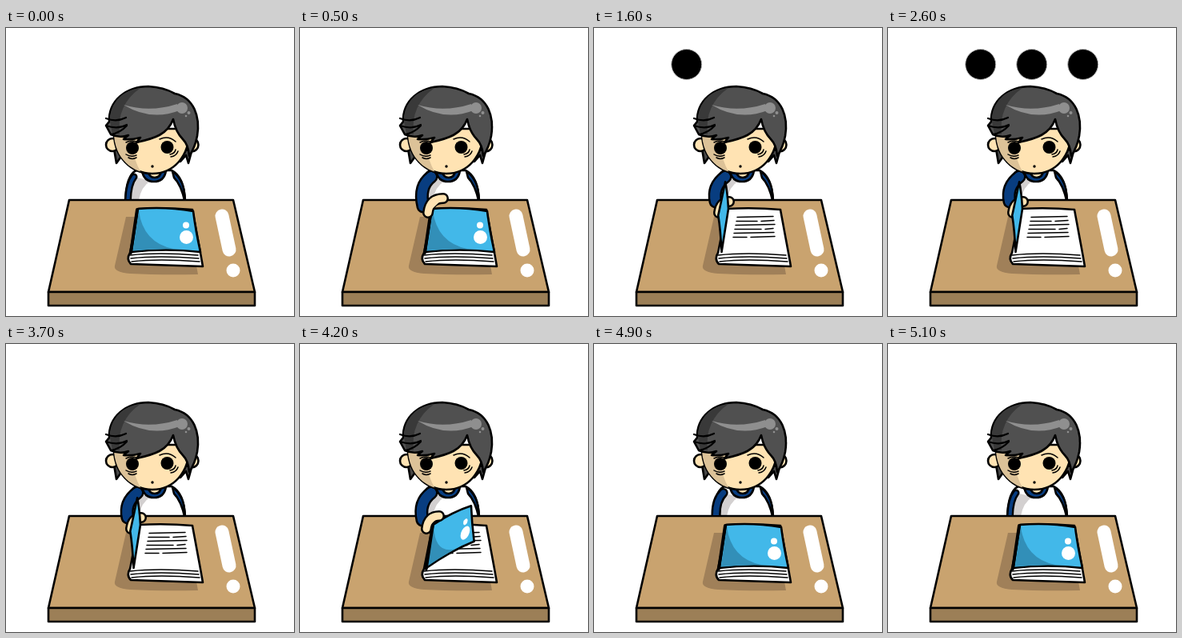
These frames come from a looping animation (360 px wide and 360 px high, 5200 ms). An HTML page:

```html
<!DOCTYPE html>
<html lang="en">
<head>
<meta charset="utf-8">
<title>Opening a book</title>
<style>
html, body { margin: 0; width: 100%; height: 100%; overflow: hidden; background: #fff; }
svg { display: block; width: 100vw; height: 100vh; }
path, circle { vector-effect: non-scaling-stroke; }
.ink { stroke: #000; stroke-width: 2.6; stroke-linejoin: round; stroke-linecap: round; }
.line { fill: none; stroke: #000; stroke-width: 1.5; stroke-linecap: round; }
.limb path { stroke-linecap: round; stroke-linejoin: round; }
.skin { fill: #ffe3b3; }
.navy { fill: #083d80; }
.gray { fill: #8f8f8f; }
</style>
</head>
<body>
<svg viewBox="0 0 360 360">
  <defs>
    <clipPath id="behind"><path d="M0 0H360V214H0Z"/></clipPath>
    <clipPath id="faceClip"><path id="face" d="M135 126C133 162 158 182 183 182S230 162 229 126Z"/></clipPath>
  </defs>
  <g id="dots" stroke="#bbb"></g>

  <!-- body -->
  <path class="ink" fill="#fff" d="M149 217Q150 184 163 178H207Q223 186 224 217Z"/>
  <path fill="#d3d0d0" d="M160 186L181 191Q169 198 166 215H157Z"/>
  <path class="ink navy" d="M208 179Q224 190 223.500 217Q219 196 210 187Z"/>
  <path class="ink navy" d="M170 178Q172 192 185 192T200 178Z"/>
  <path class="ink skin" d="M177 178Q179 187 186 187T194 178Z"/>

  <!-- table -->
  <path class="ink" fill="#c9a36f" d="M79 215H284L311 330H53Z"/>
  <path class="ink" fill="#9c7f57" d="M53 330H311V347H53Z"/>
  <path fill="#a08059" d="M150 236H163L156 292L238 297L240 308Q193 309 155 307Q134 305 136 297Z"/>
  <path stroke="#fff" stroke-width="17" stroke-linecap="round" d="M270 235L279 277"/>
  <circle cx="284" cy="303" r="8.500" fill="#fff"/>

  <!-- pages -->
  <path class="ink" fill="#fff" d="M166 226Q200 224 233 227L243 281L246 298L156 295Q150 289 155 281Z"/>
  <path id="edges" class="line"/>
  <path id="text" class="line"/>

  <g id="stack">
    <g id="cover">
      <path class="ink" fill="#42b8e9" d="M0 0Q35 -3 69 3Q72 27 78 54Q35 49 -8.500 54Z"/>
      <g id="shine">
        <path fill="#328fb8" d="M1 2Q6 42 44 50Q18 50 -6 52Z"/>
        <path class="ink" style="stroke-width:4" d="M-1 1L-9 55"/>
        <circle cx="60" cy="20.500" r="4" fill="#fff"/>
        <circle cx="60.500" cy="35.500" r="8.500" fill="#fff"/>
      </g>
    </g>
    <g id="arm" class="limb">
      <g id="sleeve" fill="none"><path stroke="#000"/><path stroke="#083d80"/></g>
      <g id="hand" class="skin"><path stroke="#000"/><path stroke="#ffe3b3"/></g>
    </g>
  </g>

  <!-- head -->
  <path class="ink" fill="#484848" d="M134 145L138 169L148 155ZM217 145L218 167L225 159L228 169L236 140Z"/>
  <circle class="ink skin" cx="133" cy="146" r="8"/>
  <circle class="ink skin" cx="232" cy="146" r="8.500"/>
  <use href="#face" class="ink skin"/>
  <path fill="#dcc298" clip-path="url(#faceClip)" d="M130 120H168Q148 145 170 183H130Z"/>
  <circle cx="158" cy="150" r="8"/>
  <circle cx="201.500" cy="149" r="8"/>
  <circle cx="183" cy="173" r="1.700"/>
  <path class="line" d="M150 143Q158 139 165 143M192 139Q203 134 212 142M150 158Q156 162 163 159M153 162Q158 165 163 162M205 158Q211 157 212 152M206 161Q213 160 215 154"/>
  <path class="ink" fill="#505050" d="M129 117C128 91 150 73 178 73Q197 74 211 82C235 87 243 111 239 135Q236 150 229 160Q228 146 221 139Q212 130 209 114C202 133 186 138 163 143L168 137Q157 140 147 139L153 134Q142 138 131 133L125 122Z"/>
  <path fill="#393939" d="M168 75C146 77 129 94 130 117L133 132L142 133Q138 96 168 75Z"/>
  <path class="line" style="stroke-width:2.2" d="M125 113Q138 118 150 112M125 122Q140 127 151 121M131 133Q143 131 151 122"/>
  <path class="gray" d="M147 96Q180 106 214 95L217 103Q181 117 147 96Z"/>
  <circle class="gray" cx="220" cy="100" r="7"/>
  <circle class="gray" cx="228.500" cy="106" r="2"/>
  <circle class="gray" cx="225" cy="110" r="1.300"/>
</svg>
<script>
const $ = id => document.getElementById(id);
const clamp = v => Math.min(1, Math.max(0, v));
const series = (n, make) => Array.from({ length: n }, (_, i) => make(i)).join('');

$('dots').innerHTML = series(3, i => `<circle cx="${115.7 + 64 * i}" cy="45.5" r="19"/>`);
$('edges').setAttribute('d', series(3, i => {
  const y = 284 + 4 * i;
  return `M${155 + i} ${y}Q190 ${y - 4} ${240 + i} ${y}`;
}));
// Lines of writing, every second one broken by a gap
$('text').setAttribute('d', series(6, i => {
  const y = 236.5 + 5 * i, left = 179 - i, right = 224 + i % 3;
  const gap = 190 + i * 37 % 23;
  return `M${left} ${y}` + (i % 2 ? `H${gap}M${gap + 5} ${y}` : '') + `L${right} ${y - 1}`;
}));

// Arm poses: elbow, wrist, palm, fingertip
const rest = [152, 196, 152.5, 222, 152, 245, 168, 235];
const reach = [148, 198, 154, 223, 160, 231, 179, 213];
const hold = [148, 198, 152, 217, 156, 231, 169, 217];
const mix = (a, b, p) => a.map((v, i) => v + (b[i] - v) * p);

function limb(id, d, width) {
  [...$(id).children].forEach((path, i) => {
    path.setAttribute('d', d);
    path.setAttribute('stroke-width', width - 5 * i);
  });
}

function draw(time) {
  const t = Math.floor(time % 5200 / 100) * 100;
  const lift = clamp(Math.min(t / 500, (5100 - t) / 500));
  const open = clamp(Math.min((t - 500) / 600, (4600 - t) / 800));

  const [ex, ey, wx, wy, px, py, fx, fy] = mix(mix(rest, reach, lift), hold, open);
  limb('sleeve', `M${160 + 4 * lift} 186Q${ex} ${ey} ${wx} ${wy}`, 9 + 8 * lift);
  limb('hand', `M${px} ${py}Q${px + 2} ${fy} ${fx} ${fy}`, 14);
  $('arm').setAttribute('clip-path', lift < 0.5 ? 'url(#behind)' : 'none');

  // Swing the cover around its slanted spine
  const angle = open * 1.62, k = Math.cos(angle), rise = 0.53 * Math.sin(angle);
  const slope = 8.5 / 54;
  $('cover').setAttribute('transform',
    `matrix(${k} ${-rise} ${slope * (k - 1)} ${1 - slope * rise} ${165 + 3 * open} 226)`);
  $('shine').style.display = open > 0.5 ? 'none' : '';
  const top = $(open > 0.5 ? 'cover' : 'arm');
  if ($('stack').lastElementChild !== top) $('stack').append(top);

  [...$('dots').children].forEach((dot, i) => {
    dot.style.display = t >= 1600 + 500 * i && t < 3700 ? '' : 'none';
  });
}

const start = performance.now();
function tick() {
  draw(performance.now() - start);
  requestAnimationFrame(tick);
}
tick();
</script>
</body>
</html>
```
